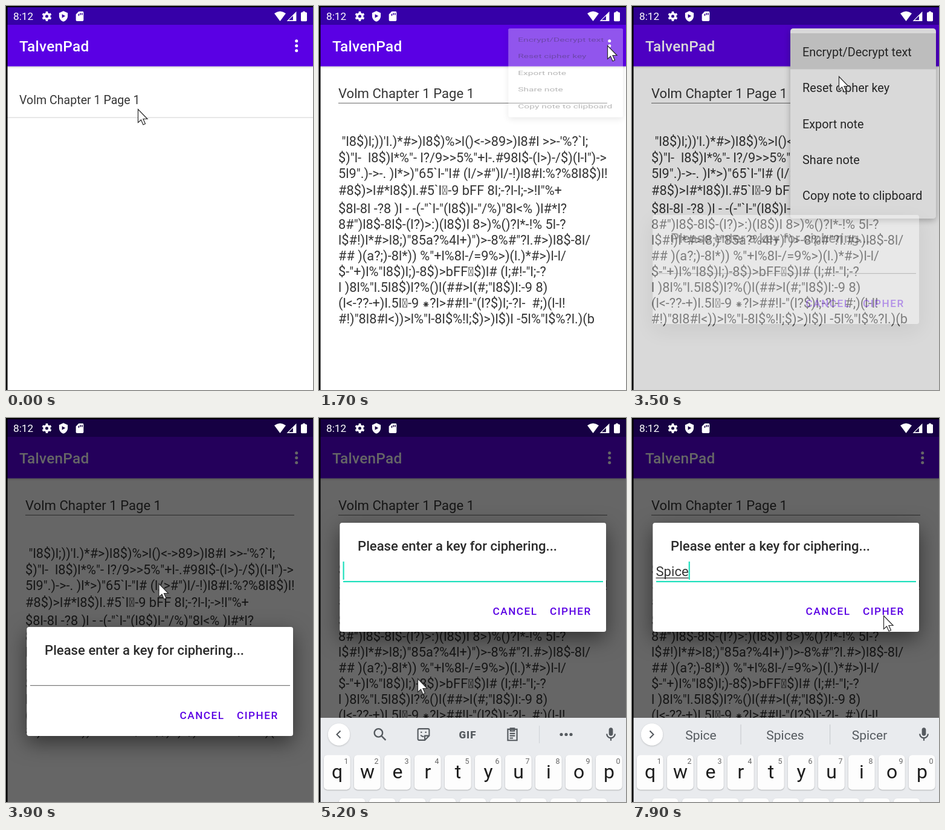
Animation of 508x634 px, one loop 8000 ms. Source, as an HTML page with a canvas:

```html
<!DOCTYPE html>
<html lang="en">
<head>
<meta charset="utf-8">
<title>Note cipher demo</title>
<style>
html, body { margin: 0; height: 100%; overflow: hidden; background: #000; }
canvas { display: block; }
</style>
</head>
<body>
<canvas id="stage" width="508" height="634"></canvas>
<script>
const c = document.getElementById('stage').getContext('2d');
const W = 508, H = 634, LOOP = 8000, STEP = 100;
const PURPLE = '#5a00e4', INK = '#363636', TEAL = '#1fe0bd', GREY = '#555a5f';
const TITLE = 'Volm Chapter 1 Page 1';
const MENU = ['Encrypt/Decrypt text', 'Reset cipher key', 'Export note', 'Share note', 'Copy note to clipboard'];
const BODY = ` "l8$)l;))'l.)*#>)l8$)%>l()<->89>)l8#l >>-'%?\`l;
$)"l-  l8$)l*%"- l?/9>>5%"+l-.#98l$-(l>)-/$)(l-l")->
5l9".)->-. )l*>)"65\`l-"l# (l/>#")l/-!)l8#l:%?%8l8$)l!
#8$)>l#*l8$)l.#5\`l▯-9 bFF 8l;-?l-l;->!l"%+
$8l-8l -?8 )l - -(-"\`l-"(l8$)l-"/%)"8l<% )l#*l?
8#")l8$-8l$-(l?)>:)(l8$)l 8>)%()?l*-!% 5l-?
l$#!)l*#>l8;)"85a?%4l+)")>-8%#"?l.#>)l8$-8l/
## )(a?;)-8l*)) %"+l%8l-/=9%>)(l.)*#>)l-l/
$-"+)l%"l8$)l;)-8$)>bFF▯$)l# (l;#!-"l;-?
l )8l%"l.5l8$)l?%()l(##>l(#;"l8$)l:-9 8)
(l<-??-+)l.5l▯-9 ⁕?l>##!l-"(l?$)l;-?l-  #;)(l-l!
#!)"8l8#l<))>l%"l-8l$%!l;$)>)l$)l -5l%"l$%?l.)(b`.split('\n');

// 24-unit icon outlines
const ICON = {
  shield: 'M12 1 3 5v6c0 5.6 3.8 10.7 9 12 5.2-1.3 9-6.4 9-12V5zM9 7.500v8l7-4z',
  card: 'M18 2h-8L4 8v12c0 1.100.9 2 2 2h12c1.100 0 2-.9 2-2V4c0-1.100-.9-2-2-2zM9 7h2v4H9zM12.500 5h2v4h-2zM16 5h2v4h-2z',
  wifi: 'M12 22 0 6Q12-3 24 6z',
  signal: 'M2 22h20V2zM15 11v9H6z',
  battery: 'M16.500 4H14V2h-4v2H7.500L6 5.300v15.400L7.500 22h9l1.500-1.300V5.300z',
  mic: 'M12 14c1.660 0 3-1.340 3-3V5c0-1.660-1.340-3-3-3S9 3.340 9 5v6c0 1.660 1.340 3 3 3zm5-3c0 2.760-2.240 5-5 5s-5-2.240-5-5H5c0 3.530 2.610 6.430 6 6.920V21h2v-3.080c3.390-.49 6-3.390 6-6.920z',
  search: 'M16 9.500a6.500 6.500 0 1 1-13 0a6.500 6.500 0 1 1 13 0M14.500 14.500 21 21',
  sticker: 'M5 3h14a2 2 0 0 1 2 2v9l-7 7H5a2 2 0 0 1-2-2V5a2 2 0 0 1 2-2M14 21v-7h7M8.500 7.500v2M15.500 7.500v2M7.500 13q2 3 5 2',
  clip: 'M5 4h14v17H5zM9 2.500h6v4H9zM8 10.500h8M8 14h8M8 17.500h5',
  left: 'M14.500 6 8.500 12l6 6',
  right: 'M9.500 6l6 6-6 6',
  arrow: 'M0 0V22L5 17.500 8.500 25.500 12 24 8.500 16H15.500z'
};
const paths = Object.fromEntries(Object.entries(ICON).map(([k, d]) => [k, new Path2D(d)]));

const POINTER = [[0, 218, 170], [200, 218, 171], [600, 216, 185], [900, 226, 180], [1500, 478, 64],
  [1900, 476, 66], [2300, 373, 111], [2600, 352, 114], [3100, 345, 86], [3400, 343, 92], [3500, 342, 116],
  [4300, 163, 430], [6300, 163, 430], [6800, 408, 333], [7300, 416, 326]];
const TYPED = [[0, ''], [5500, 'S'], [5700, 'Sp'], [5900, 'Spi'], [6100, 'Spic'], [6400, 'Spice']];
const HINTS = [[0, ''], [5500, 'So See She'], [5800, 'Sp Spa Speed'], [6000, 'Spi Spice Spirit'], [6300, 'Spice Spices Spicer']];

// Linear interpolation through [time, value...] points
function at(t, pts, n = 1) {
  const i = pts.findIndex(p => p[0] > t);
  if (i < 0) return pts[pts.length - 1][n];
  if (!i) return pts[0][n];
  const a = pts[i - 1], b = pts[i];
  return a[n] + (b[n] - a[n]) * (t - a[0]) / (b[0] - a[0]);
}
const last = (t, list) => list.filter(p => p[0] <= t).pop()[1];

function rect(x, y, w, h, color) { c.fillStyle = color; c.fillRect(x, y, w, h); }
function dot(x, y, r, color) { c.fillStyle = color; c.beginPath(); c.arc(x, y, r, 0, 7); c.fill(); }
function text(s, x, y, size, color = INK, weight = 400, align = 'left', spacing = 0) {
  c.font = `${weight} ${size}px Roboto, sans-serif`;
  c.letterSpacing = spacing + 'px';
  c.textAlign = align;
  c.fillStyle = color;
  c.fillText(s, x, y);
}
// Rounded box; its shadow is kept outside so that fading boxes stay clear
function card(x, y, w, h, r, color, blur, dy, shade) {
  const box = new Path2D(), outside = new Path2D();
  box.roundRect(x, y, w, h, r);
  outside.rect(0, 0, W, H + 400);
  outside.addPath(box);
  c.save();
  c.clip(outside, 'evenodd');
  c.shadowColor = `rgba(0,0,0,${shade})`;
  c.shadowBlur = blur;
  c.shadowOffsetY = dy;
  c.fillStyle = color;
  c.fill(box);
  c.restore();
  c.fillStyle = color;
  c.fill(box);
}
function icon(name, x, y, size, color, line) {
  c.save();
  c.translate(x - size / 2, y - size / 2);
  c.scale(size / 24, size / 24);
  c.fillStyle = c.strokeStyle = color;
  c.lineWidth = line;
  if (line) c.stroke(paths[name]); else c.fill(paths[name], 'evenodd');
  c.restore();
}
function faded(alpha, draw) {
  if (alpha <= 0) return;
  c.save();
  c.globalAlpha = alpha;
  draw(alpha);
  c.restore();
}

function header() {
  rect(0, 0, W, 31, '#3600a8');
  card(0, 31, W, 68.5, 0, PURPLE, 3, 1, .2);
  text('TalvenPad', 22, 75, 24.4, '#fff', 500, 'left', .25);
  for (const y of [57.7, 65.7, 73.7]) dot(480.7, y, 2.5, '#fff');
}

function status() {
  text('8:12', 12, 23, 17.2, '#fff');
  c.strokeStyle = '#fff';
  c.lineWidth = 3.6;
  c.beginPath(); c.arc(67.5, 17, 4.3, 0, 7); c.stroke();
  for (let i = 0; i < 6; i++) {
    const a = i * Math.PI / 3 + Math.PI / 6;
    c.beginPath();
    c.moveTo(67.5 + 5 * Math.cos(a), 17 + 5 * Math.sin(a));
    c.lineTo(67.5 + 8 * Math.cos(a), 17 + 8 * Math.sin(a));
    c.stroke();
  }
  icon('shield', 95, 17, 19, '#fff');
  icon('card', 122, 17, 19, '#fff');
  icon('wifi', 453.5, 17, 19, '#fff');
  icon('signal', 472.5, 17, 19, '#fff');
  icon('battery', 493, 17, 20, '#fff');
}

function list(t) {
  faded(at(t, [[0, 0], [100, .06], [200, .14]]), () => rect(0, 100, W, 84, '#000'));
  text(TITLE, 22, 162, 19.6);
  rect(0, 183.5, W, 1.5, '#e0e0e0');
}

function note(dy) {
  rect(0, 100, W, H, '#fff');
  c.translate(0, dy);
  text(TITLE, 32, 152, 22.1);
  rect(32, 159.8, 445, 1.2, '#808080');
  BODY.forEach((line, i) => {
    const y = i < 3 ? 231.3 + 26.3 * i : i < 4 ? 311.5 : 341.8 + 26 * (i - 4);
    let x = 32;
    line.split('▯').forEach((part, k) => {
      if (k) {
        c.strokeStyle = '#666';
        c.lineWidth = 1;
        c.strokeRect(x + 1.5, y - 14.5, 7, 14);
        c.beginPath();
        c.moveTo(x + 2, y - 14); c.lineTo(x + 8, y - 1);
        c.moveTo(x + 8, y - 14); c.lineTo(x + 2, y - 1);
        c.stroke();
        x += 10;
      }
      text(part, x, y, 21.8);
      x += c.measureText(part).width;
    });
  });
}

function menu(t) {
  const grow = at(t, [[1600, .2], [1900, 1]]);
  c.translate(503, 37);
  c.scale(.6 + .4 * grow, grow);
  c.translate(-503, -37);
  card(262, 37, 241, 314, 5, '#fff', 11, 3, .28);
  faded(at(t, [[3100, 0], [3400, .13]]), () => rect(262, 45, 241, 59.5, '#000'));
  MENU.forEach((s, i) => text(s, 282, 83.3 + 59.1 * i, 19.85, '#2b2b2b'));
}

function dialog(t, y, alpha) {
  card(34.5, y, 440.5, 180, 4, '#fff', 34, 11, .5 * alpha);
  text('Please enter a key for ciphering...', 64, y + 45.5, 22.1, '#2b2b2b', 500);
  const active = t >= 4000;
  rect(40, y + 96, 430, active ? 2.2 : 1.2, active ? TEAL : '#777');
  const typed = last(t, TYPED);
  text(typed, 39.5, y + 87.5, 22.1);
  const end = 39.5 + c.measureText(typed).width;
  const marked = t >= 6100 && t < 6300 ? 'Spi' : typed;
  rect(39.5, y + 90.5, c.measureText(marked).width, 1.3, '#333');
  const lit = t < 6900 ? active : (t - 6900) % 1000 < 500;
  if (lit) rect(end, y + 64, 2.2, 30, TEAL);
  text('CANCEL', 287.5, y + 152, 17.2, PURPLE, 500, 'left', 1.5);
  text('CIPHER', 382, y + 152, 17.2, PURPLE, 500, 'left', 1.5);
}

function keyboard(t, y) {
  rect(0, y, W, 400, '#e9ebee');
  const hints = last(t, HINTS), mid = y + 27.5;
  card(15, mid - 18, 36, 36, 18, '#fff', 3, 1, .2);
  if (hints) {
    icon('right', 32, mid, 24, GREY, 2);
    hints.split(' ').forEach((s, i) => text(s, 114 + 139.5 * i, y + 35.5, 21, GREY, 400, 'center'));
    rect(179.5, y + 11, 1.2, 33, '#c9ccd0');
    rect(327, y + 11, 1.2, 33, '#c9ccd0');
  } else {
    icon('left', 33, mid, 24, GREY, 2);
    icon('search', 101, mid, 25, GREY, 2.3);
    icon('sticker', 173, mid, 25, GREY, 2);
    text('GIF', 246, mid + 6, 17, GREY, 900, 'center', 1);
    icon('clip', 320, mid, 26, GREY, 2);
    rect(364, y + 13, 1.2, 29, '#d2d5d9');
    for (const x of [401, 409, 417]) dot(x, mid, 2.6, GREY);
  }
  icon('mic', 483, mid, 27, GREY);
  [...'qwertyuiop'].forEach((k, i) => {
    const x = 8 + 50 * i;
    card(x, y + 61.5, 43.5, 57, 6, '#fdfdfd', 2, 1, .3);
    text(k, x + 22, y + 100, 32, '#1d1d1d', 400, 'center');
    text((i + 1) % 10, x + 37, y + 76, 12.5, '#666', 400, 'center');
  });
  for (let i = 0; i < 9; i++) card(33 + 50 * i, y + 133, 43.5, 57, 6, '#fdfdfd', 2, 1, .3);
}

function pointer(t) {
  c.save();
  c.translate(at(t, POINTER, 1) + .5, at(t, POINTER, 2) + .5);
  c.fillStyle = '#fff';
  c.fill(paths.arrow);
  c.strokeStyle = '#2a2a2a';
  c.lineWidth = 1.2;
  c.stroke(paths.arrow);
  c.restore();
}

function draw(t) {
  rect(0, 0, W, H, '#fff');
  if (t < 600) list(t);
  const shown = at(t, [[200, 0], [600, 1]]);
  faded(shown, () => note(40 * (1 - shown) ** 2));
  header();
  faded(at(t, [[1600, 0], [1900, 1], [3500, 1], [3700, 0]]), () => menu(t));
  rect(0, 0, W, H, `rgba(0,0,0,${at(t, [[3400, 0], [3500, .15], [3800, .6]])})`);
  status();
  faded(at(t, [[3400, 0], [3500, .38], [3700, 1]]), alpha =>
    dialog(t, at(t, [[4300, 345], [4500, 280], [4700, 214], [4900, 173]]), alpha));
  if (t >= 4300) keyboard(t, at(t, [[4300, 640], [4700, 538], [4900, 495]]));
  pointer(t);
  rect(0, 0, W, 2, '#000');
  rect(0, 0, 2.5, H, '#000');
}

function tick(now) {
  draw(Math.floor(now % LOOP / STEP) * STEP);
  requestAnimationFrame(tick);
}
requestAnimationFrame(tick);
</script>
</body>
</html>
```
